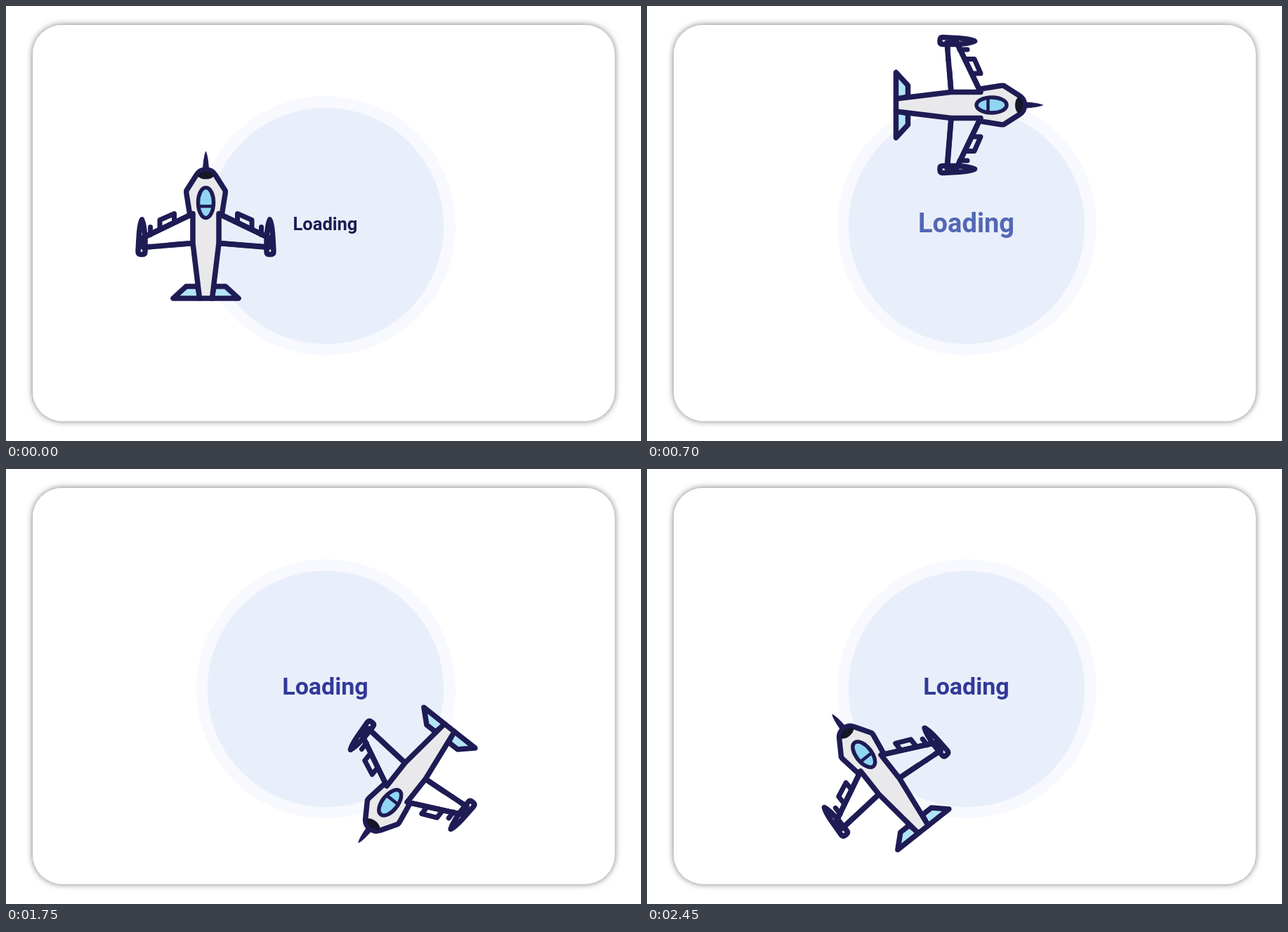
An HTML page for the animation above (2.8 s loop, 904 px wide and 619 px high).

```html
<!DOCTYPE html>
<html lang="en">
<head>
<meta charset="utf-8">
<title>Loading</title>
<style>
  html, body { margin: 0; width: 100%; height: 100%; overflow: hidden; background: #fff; }
  svg { display: block; width: 100%; height: 100%; }
  #label { font-family: Roboto, Arial, sans-serif; font-weight: 600; text-anchor: middle; }
  #plane { stroke: #1f1b54; stroke-width: 7.5; stroke-linecap: round; stroke-linejoin: round; fill: none; }
  #plane .sky { fill: #b2e4f7; stroke: none; }
  #plane .solid { fill: #1f1b54; stroke-width: 1; }
</style>
</head>
<body>
<svg viewBox="0 0 904 619">
  <defs>
    <filter id="shadow" x="-5%" y="-5%" width="110%" height="110%">
      <feDropShadow dx="0" dy="0" stdDeviation="5" flood-color="#000" flood-opacity=".55"/>
    </filter>
    <g id="side">
      <path class="sky" d="M18 -18L89 16V30L18 24Z"/>
      <path d="M18.5 -18L89 16"/>
      <path d="M45 -8V-18L65.5 -9V2.5" stroke-width="7"/>
      <path d="M79 1V12" stroke-width="7"/>
      <path class="solid" d="M91 -9.5C93.5 -5 95 8 95.5 18L96.5 36Q96.5 40 92 40H90Q86.500 40 86.500 36V18C87 6 89 -5 91 -9.500Z"/>
      <path d="M12 85.500H28L46.500 102.500H8Z" fill="#b2e4f7"/>
    </g>
  </defs>
  <rect x="38" y="27" width="828.500" height="563.500" rx="42" fill="#fff" filter="url(#shadow)"/>
  <circle cx="455.500" cy="312.800" r="184.500" fill="#f7f9fe"/>
  <circle cx="455" cy="313" r="168.300" fill="#e9effa"/>
  <text id="label" x="454.500">Loading</text>
  <g id="plane">
    <use href="#side"/>
    <use href="#side" transform="scale(-1 1)"/>
    <path d="M18.500 24L90 29.500M-18.500 24L-50.500 26.500M-64.500 28h.01M-79 29L-88 29.500"/>
    <path class="solid" d="M0 -106C2 -102 3.500 -91 4 -81H-4C-3.500 -91 -2 -102 0 -106Z"/>
    <path d="M0 -80.500Q9 -80.500 13.500 -73L27.500 -51Q28 -49 27.500 -46L23 -18H18.500V24L9 102.500H-9L-18.500 24V-18H-23L-27.500 -46Q-28 -49 -27.500 -51L-13.500 -73Q-9 -80.500 0 -80.500Z" fill="#e9e9eb"/>
    <path d="M-12 -72Q-8 -78 0 -78Q8 -78 12 -72Q8 -67 0 -67Q-8 -67 -12 -72Z" fill="#151727" stroke="none"/>
    <path d="M0 -55C7 -55 11 -44 11 -34C11 -22 6 -12 0 -12C-6 -12 -11 -22 -11 -34C-11 -44 -7 -55 0 -55Z" fill="#8fd6f2" stroke-width="5.500"/>
    <path d="M-10 -28.500H10" stroke-width="4.500"/>
  </g>
</svg>
<script>
  const STEP = 350;
  const TILT = 38.4;
  const label = document.getElementById('label');
  const plane = document.getElementById('plane');

  // x, y, heading, mirror
  const poses = [
    [284.5, 313.5, 0, 1],
    [340.3, 193.5, TILT, 1],
    [457, 141, 90, 1],
    [581, 192.3, 90 + TILT, 1],
    [628, 318.5, 180, 1],
    [567.7, 448.5, 180 + TILT, 1],
    [437.5, 484, 270, 1],
    [329.7, 432.5, -TILT, -1]
  ];

  // font size, baseline, colour
  const small = [25.5, 318.5, '#1f1b53'];
  const medium = [34, 320.7, '#32399a'];
  const large = [38, 321.8, '#5367b4'];
  const pulse = [small, medium, large, medium];

  function draw(time) {
    const step = Math.floor(time / STEP) % poses.length;
    const [x, y, heading, mirror] = poses[step];
    plane.setAttribute('transform', `translate(${x} ${y}) rotate(${heading}) scale(${mirror} 1)`);
    const [size, baseline, colour] = pulse[step % pulse.length];
    label.setAttribute('font-size', size);
    label.setAttribute('y', baseline);
    label.setAttribute('fill', colour);
  }

  const start = performance.now();
  function tick() {
    draw(performance.now() - start);
    requestAnimationFrame(tick);
  }
  tick();
</script>
</body>
</html>
```
